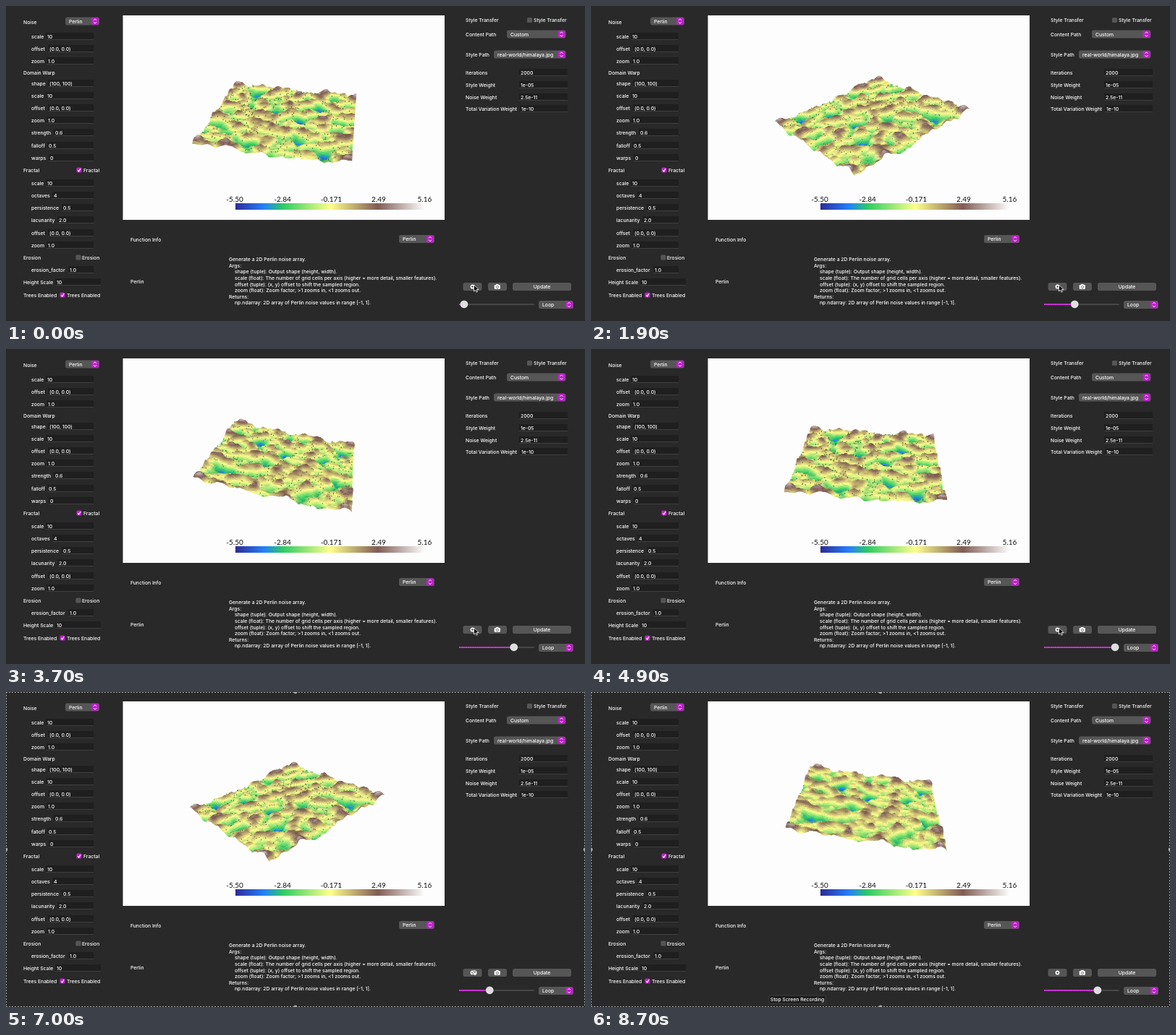
These frames come from a looping animation (800x436 px, 8800 ms). An HTML page with a canvas:

```html
<!DOCTYPE html>
<html lang="en">
<head>
<meta charset="utf-8">
<title>Terrain viewer</title>
<style>
html, body { margin: 0; width: 100%; height: 100%; overflow: hidden; background: #292929; }
svg { position: absolute; left: 0; top: 0; display: block; }
canvas { position: absolute; left: 162px; top: 13px; }
text { font: 500 6.8px Inter, "Open Sans", sans-serif; fill: #fff; white-space: pre; }
.scale { font: 10px Lato, "Liberation Sans", sans-serif; fill: #111; text-anchor: middle; }
.mid { text-anchor: middle; }
</style>
</head>
<body>
<svg id="ui" width="800" height="436" viewBox="0 0 800 436"></svg>
<canvas id="view" width="444" height="283"></canvas>
<script>
const LOOP = 8800, STEP = 100, ORBIT = 5100;
const ui = document.getElementById('ui');
const ctx = document.getElementById('view').getContext('2d');

// ---------- interface ----------
const PINK = '#bb22c6';
const rect = (x, y, w, h, fill, extra = '') =>
  `<rect x="${x}" y="${y}" width="${w}" height="${h}" fill="${fill}" ${extra}/>`;
const path = (d, stroke, width = 1, extra = '') =>
  `<path d="${d}" fill="none" stroke="${stroke}" stroke-width="${width}" ${extra}/>`;
const label = (x, y, s, cls = '') => `<text x="${x}" y="${y + 2.5}" class="${cls}">${s}</text>`;

function field(x, y, name, vx, value, end = 121) {
  return label(x, y, name) + rect(vx - 2, y - 5, end - vx + 2, 10, '#1f1f1f') +
    rect(vx - 2, y + 4.4, end - vx + 2, 0.6, '#555') + label(vx, y + 0.3, value);
}

function combo(x, y, w, value) {
  const cx = x + w - 6;
  return rect(x, y - 5.5, w, 11, '#565656', 'rx="2.8"') +
    label(x + 5, y, value) +
    rect(x + w - 11, y - 5, 10, 10, PINK, 'rx="2.4"') +
    path(`M${cx - 2} ${y - 1.2}l2 -2l2 2M${cx - 2} ${y + 1.2}l2 2l2 -2`, '#fff', 0.9);
}

function check(x, y, on, name, tx) {
  return rect(x - 3.6, y - 3.6, 7.2, 7.2, on ? PINK : '#555', 'rx="1.7"') +
    (on ? path(`M${x - 1.8} ${y + 0.2}l1.5 1.8l2.4 -4`, '#fff', 1.1) : '') + label(tx, y, name);
}

const button = (x, w) => rect(x, 383, w, 11, '#565656', 'rx="2.8"');

const fields = [
  [35, 42, 'scale', 57, '10'], [35, 59, 'offset', 60, '(0.0, 0.0)'], [35, 76, 'zoom', 58, '1.0'],
  [35, 107, 'shape', 60, '(100, 100)'], [35, 124, 'scale', 57, '10'],
  [35, 141, 'offset', 60, '(0.0, 0.0)'], [35, 158, 'zoom', 58, '1.0'],
  [35, 175, 'strength', 68, '0.6'], [35, 193, 'falloff', 59, '0.5'], [35, 210, 'warps', 61, '0'],
  [35, 245, 'scale', 57, '10'], [35, 262, 'octaves', 66, '4'], [35, 279, 'persistence', 79, '0.5'],
  [35, 296, 'lacunarity', 73, '2.0'], [35, 314, 'offset', 60, '(0.0, 0.0)'], [35, 331, 'zoom', 58, '1.0'],
  [35, 365, 'erosion_factor', 88, '1.0'], [24, 382, 'Height Scale', 70, '10', 131],
  [635, 92, 'Iterations', 711, '2000', 776], [635, 109, 'Style Weight', 711, '1e-05', 776],
  [635, 126, 'Noise Weight', 711, '2.5e-11', 776], [635, 142, 'Total Variation Weight', 712, '1e-10', 776]
];
const doc = [
  'Generate a 2D Perlin noise array.',
  'Args:',
  '    shape (tuple): Output shape (height, width).',
  '    scale (float): The number of grid cells per axis (higher = more detail, smaller features).',
  '    offset (tuple): (x, y) offset to shift the sampled region.',
  '    zoom (float): Zoom factor; &gt;1 zooms in, &lt;1 zooms out.',
  'Returns:',
  '    np.ndarray: 2D array of Perlin noise values in range [-1, 1].'
];
const docLine = (s, i) => label(s[0] === ' ' ? 316 : 308, 350.5 + i * 8.63, s.trim());

// terrain colour map: position, red, green, blue
const STOPS = [
  [0, 46, 42, 152], [0.15, 36, 128, 250], [0.25, 45, 204, 98],
  [0.5, 255, 255, 140], [0.75, 128, 92, 84], [1, 255, 255, 255]
];
const gradient = STOPS.map(([p, r, g, b]) =>
  `<stop offset="${p}" stop-color="rgb(${r},${g},${b})"/>`).join('');

ui.innerHTML =
  `<defs><linearGradient id="map">${gradient}</linearGradient></defs>` +
  rect(0, 0, 800, 436, '#292929') + rect(161.5, 13, 444.5, 283, '#fdfdfd') +
  rect(317, 273, 262, 9, 'url(#map)') +
  ['-5.50', '-2.84', '-0.171', '2.49', '5.16'].map((s, i) =>
    label([316, 382, 449.5, 515, 578.5][i], 268.5, s, 'scale')).join('') +
  fields.map(f => field(...f)).join('') +
  label(24, 22, 'Noise') + combo(82, 21, 47, 'Perlin') +
  label(24, 92, 'Domain Warp') +
  label(24, 227, 'Fractal') + check(101, 227, true, 'Fractal', 107) +
  label(24, 348, 'Erosion') + check(100, 348, false, 'Erosion', 105) +
  label(24, 400, 'Trees Enabled') + check(78, 400, true, 'Trees Enabled', 84) +
  label(635, 19.5, 'Style Transfer') + check(723.5, 19.5, false, 'Style Transfer', 729) +
  label(635, 39.5, 'Content Path') + combo(692, 39, 81.5, 'Custom') +
  label(635, 67.5, 'Style Path') + combo(674, 67, 99.5, 'real-world/himalaya.jpg') +
  label(172, 323, 'Function Info') + combo(543, 322.5, 49, 'Perlin') +
  label(172, 381, 'Perlin') + doc.map(docLine).join('') +
  button(631.5, 26) + button(666, 26) + button(700, 81) + label(740.5, 388.5, 'Update', 'mid') +
  '<circle cx="644.5" cy="388.5" r="2.1" fill="none" stroke="#fff" stroke-width="1.6"/>' +
  rect(674.7, 386, 8.2, 5.8, '#fff', 'rx="1"') + rect(677, 385, 3.6, 2, '#fff') +
  '<circle cx="678.8" cy="388.9" r="1.6" fill="#fff" stroke="#5c5c5c" stroke-width=".8"/>' +
  rect(626, 412, 104, 2, '#474747', 'rx="1"') +
  `<g id="done">${path('', PINK, 2)}${path('', '#d04ad8', 2, 'stroke-dasharray="1 1.5"')}</g>` +
  '<circle id="knob" cy="412.8" r="5.4" fill="#dedede"/>' +
  combo(736, 413.5, 48, 'Loop') +
  '<path id="arrow" d="M646.5 386v9l2.1 -1.9l1.4 3.1l1.5 -.7l-1.4 -3h2.9z" fill="#000" stroke="#fff" stroke-width=".8"/>' +
  `<g id="hand"><circle cx="647" cy="388.5" r="3.6" fill="#eee"/>${path('M643 387l3 3M645.5 385.5l2 3M648 385.5l.5 3M644 391l3 1', '#333', 0.7)}</g>` +
  `<g id="frame">${path('M0 .5H800M0 435.5H800M.5 0V436M799.5 0V436', '#a2a2a2', 1, 'stroke-dasharray="2 2"')}` +
  [[400, 0], [400, 436], [0, 218], [800, 218]].map(([x, y]) =>
    `<circle cx="${x}" cy="${y}" r="2.4" fill="#aaa"/>`).join('') + '</g>' +
  `<g id="tip">${rect(246, 420, 78, 11, '#1d1d1d', 'stroke="#484848" stroke-width=".7" rx="1"')}${label(285, 425.4, 'Stop Screen Recording', 'mid')}</g>`;

const el = id => document.getElementById(id);
const show = (id, on) => el(id).setAttribute('visibility', on ? 'visible' : 'hidden');

// ---------- terrain ----------
const N = 100, SIDE = 192, DIST = 592, UP = 0.888, TILT = 0.46;
const LOW = -5.5, HIGH = 5.16, SHADES = 12;

function rnd(i, j) {
  const s = Math.sin(i * 127.1 + j * 311.7) * 43758.5453;
  return s - Math.floor(s);
}
const mix = (a, b, t) => a + (b - a) * t;
const fade = t => t * t * t * (t * (t * 6 - 15) + 10);

function perlin(x, y) {
  const i = Math.floor(x), j = Math.floor(y), fx = x - i, fy = y - j;
  const dot = (a, b) => {
    const ang = rnd(i + a, j + b) * 2 * Math.PI;
    return Math.cos(ang) * (fx - a) + Math.sin(ang) * (fy - b);
  };
  return mix(mix(dot(0, 0), dot(1, 0), fade(fx)), mix(dot(0, 1), dot(1, 1), fade(fx)), fade(fy));
}

// main basins and peaks on the unit square
const basins = [[.38, .26], [.2, .13], [.63, .5], [.35, .94], [.53, .99], [.12, .71], [.66, .82],
  [.76, .3], [.9, .59], [.83, .92]];
const peaks = [[.05, .04], [.38, .02], [.76, .03], [.98, .05], [.16, .5], [.48, .8], [.96, .74],
  [.97, .97], [.54, .13], [.18, .96], [.02, .98], [.4, .62], [.75, .49]];
const bumps = (list, x, y) =>
  list.reduce((sum, [a, b]) => sum + Math.exp(-420 * ((x - a) ** 2 + (y - b) ** 2)), 0);

function altitude(x, y) {
  let h = 2.3 * (bumps(peaks, x, y) - bumps(basins, x, y));
  for (let o = 0, amp = 4.8; o < 4; o++, amp *= 0.42) {
    const f = 10 * 2 ** o;
    h += amp * perlin(x * f + 3.3 + o * 17, y * f + 7.7);
  }
  return Math.max(LOW, Math.min(HIGH, h));
}

const W = N + 1, height = new Float32Array(W * W);
for (let j = 0; j < W; j++)
  for (let i = 0; i < W; i++) height[j * W + i] = altitude(i / N, j / N);

const palette = [];
for (let c = 0; c < 128; c++) {
  const p = c / 127, k = Math.max(1, STOPS.findIndex(s => s[0] >= p));
  const a = STOPS[k - 1], b = STOPS[k], t = (p - a[0]) / (b[0] - a[0]);
  for (let s = 0; s <= SHADES; s++) {
    const light = 0.6 + 0.4 * s / SHADES;
    palette.push(`rgb(${[1, 2, 3].map(n => Math.round(mix(a[n], b[n], t) * light))})`);
  }
}

const px = new Float32Array(W * W), py = new Float32Array(W * W);

function drawTerrain(deg) {
  const a = deg * Math.PI / 180, c = Math.cos(a), s = Math.sin(a);
  const roll = (5.4 * c - 6.1 * s - 2.5 * Math.cos(2 * a)) * Math.PI / 180;
  const unit = SIDE / N;
  for (let j = 0, n = 0; j < W; j++)
    for (let i = 0; i < W; i++, n++) {
      const x = (i - N / 2) * unit, z = (j - N / 2) * unit, h = height[n] * unit;
      const u = x * c - z * s, v = x * s + z * c;
      const k = 1 / (1 - (v * UP + h * TILT) / DIST);
      px[n] = u * k;
      py[n] = k * (v * TILT - h * UP);
    }

  ctx.setTransform(1, 0, 0, 1, 0, 0);
  ctx.clearRect(0, 0, 444, 283);
  ctx.translate(222, 141.5);
  ctx.rotate(roll);
  for (let jj = 0; jj < N; jj++)
    for (let ii = 0; ii < N; ii++) {
      const j = c > 0 ? jj : N - 1 - jj, i = s > 0 ? ii : N - 1 - ii;
      drawCell(i, j, s, c);
    }
}

function drawCell(i, j, s, c) {
  const n = j * W + i, quad = [n, n + 1, n + W + 1, n + W];
  const [h0, h1, h2, h3] = quad.map(q => height[q]);
  const mean = (h0 + h1 + h2 + h3) / 4;
  const gx = (h1 + h2 - h0 - h3) / 2, gz = (h2 + h3 - h0 - h1) / 2;
  const facing = (TILT - UP * (gx * s + gz * c)) / Math.hypot(1, gx, gz);
  const light = Math.max(0, Math.min(1, 0.4 + 0.95 * facing));
  const tone = Math.round((mean - LOW) / (HIGH - LOW) * 127);
  const mx = (px[quad[0]] + px[quad[2]]) / 2, my = (py[quad[0]] + py[quad[2]]) / 2;
  ctx.fillStyle = palette[tone * (SHADES + 1) + Math.round(light * SHADES)];
  ctx.beginPath();
  // grow each cell a little so that no seams show
  for (const q of quad)
    ctx.lineTo(px[q] + 0.35 * Math.sign(px[q] - mx), py[q] + 0.35 * Math.sign(py[q] - my));
  ctx.fill();
  if (rnd(i + 0.5, j + 9.2) > 0.945 && mean > -1.8 && mean < 0.9) {
    ctx.fillStyle = '#2c5427';
    ctx.fillRect(px[n] - 0.4, py[n] - 1.5, 0.9, 1.5);
  }
}

// ---------- playback ----------
function render(t) {
  const p = (t + 50) % ORBIT, x = 632 + 0.0186 * p;
  drawTerrain(5.5 + 0.0719 * Math.min(p, 5007));
  el('knob').setAttribute('cx', x);
  for (const line of el('done').children) line.setAttribute('d', `M626 413H${x}`);
  show('arrow', t < 6800);
  show('frame', t >= 6800);
  show('hand', t >= 6800 && t < 8200);
  show('tip', t >= 8300);
}

let last = -1;
function tick() {
  const t = Math.floor(performance.now() % LOOP / STEP) * STEP;
  if (t !== last) render(last = t);
  requestAnimationFrame(tick);
}
tick();
</script>
</body>
</html>
```
